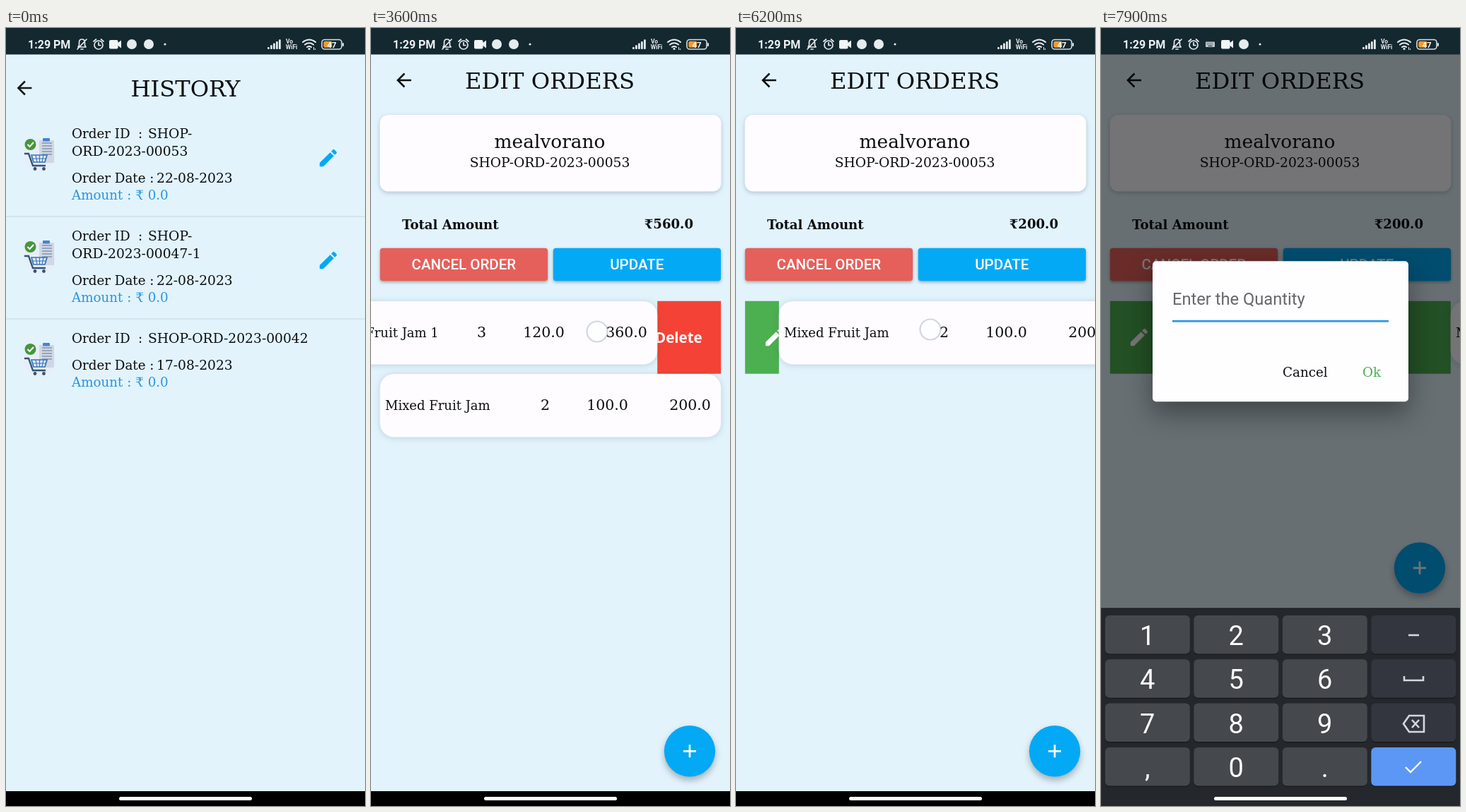
Write an HTML page that moves like this. It is 508 px wide and 1102 px high and loops after 8000 ms.

```html
<!DOCTYPE html>
<html lang="en">
<head>
<meta charset="utf-8">
<title>Order history</title>
<style>
html, body { margin: 0; width: 100%; height: 100%; overflow: hidden; background: #000; }
svg { display: block; width: 508px; height: 1102px; }
text { font: 18.3px 'DejaVu Serif', 'Noto Serif', 'DejaVu Sans', serif; fill: #0b0d10; white-space: pre; }
.title { font-size: 32.2px; }
.shop { font-size: 26.4px; }
.code { font-size: 18.7px; }
.name { font-size: 18px; }
.num { font-size: 20.5px; }
.bold { font-weight: 700; font-size: 18.1px; }
.amount { fill: #2795e0; }
.button { font: 500 20.5px Roboto, sans-serif; fill: #fff; }
.swipe { font: 700 20.5px 'Noto Sans', 'Open Sans', sans-serif; fill: #fff; }
.hint { font: 23.7px Roboto, sans-serif; fill: #67666a; }
.key { font: 38px Roboto, sans-serif; fill: #fff; }
.clock { font: 700 16px Roboto, sans-serif; fill: #eef2f4; }
.tiny { font: 700 8.5px Roboto, sans-serif; fill: #e6ebee; }
.level { font: 700 11.5px Roboto, sans-serif; fill: #fff; }
.card { fill: #fefcff; filter: drop-shadow(0 2px 3px rgba(40, 70, 90, .27)); }
.soft { fill: #fefcff; filter: drop-shadow(0 1px 5px rgba(40, 70, 90, .2)); }
.raised { filter: drop-shadow(0 2px 2px rgba(0, 0, 0, .3)); }
.fab { filter: drop-shadow(0 5px 5px rgba(0, 0, 0, .28)); }
.dialog { fill: #fefdff; filter: drop-shadow(0 16px 18px rgba(0, 0, 0, .38)); }
.line { fill: none; stroke: #e6ebee; stroke-width: 1.7; stroke-linecap: round; stroke-linejoin: round; }
</style>
</head>
<body>
<svg id="stage" viewBox="0 0 508 1102" xmlns="http://www.w3.org/2000/svg"></svg>
<script>
const LOOP = 8000, STEP = 100, ROW = 103, TRAVEL = 482;
const PENCIL = 'M3 17.25V21h3.75L17.81 9.94l-3.75-3.75L3 17.25zM20.71 7.04a1 1 0 0 0 0-1.41l-2.34-2.34a1 1 0 0 0-1.41 0l-1.83 1.83 3.75 3.75 1.83-1.83z';
const ARROW = 'M20 11H7.83l5.59-5.59L12 4l-8 8 8 8 1.41-1.41L7.83 13H20v-2z';
const TRASH = 'M6 19c0 1.1.9 2 2 2h8c1.1 0 2-.9 2-2V7H6v12zM19 4h-3.5l-1-1h-5l-1 1H5v2h14V4z';

const text = (x, y, s, cls = '', anchor = 'start', extra = '') =>
  `<text x="${x}" y="${y}" class="${cls}" text-anchor="${anchor}" ${extra}>${s}</text>`;
const mid = (x, y, s, cls) => text(x, y, s, cls, 'middle');
const rect = (x, y, w, h, fill, r = 0, extra = '') =>
  `<rect x="${x}" y="${y}" width="${w}" height="${h}" rx="${r}" fill="${fill}" ${extra}/>`;
const dot = (x, y, r, fill) => `<circle cx="${x}" cy="${y}" r="${r}" fill="${fill}"/>`;
const path = (d, extra = 'class="line"') => `<path d="${d}" ${extra}/>`;
const icon = (d, x, y, scale, fill) =>
  path(d, `fill="${fill}" transform="translate(${x} ${y}) scale(${scale}) translate(-12 -12)"`);
const group = (id, body, extra = '') => `<g id="${id}" ${extra}>${body}</g>`;

function cart(y) {
  const lines = [5, 9, 13, 17, 21].map(k => `M51 ${158 + k}h14`).join('');
  return `<g transform="translate(0 ${y})">` + dot(48, 180, 23, '#e8eef8')
    + rect(47, 159, 21, 32, '#cfd8e2', 1) + rect(52, 156, 10, 4.5, '#4583d2', 1)
    + path(lines, 'stroke="#8294b4" stroke-width="1.3"')
    + dot(34.5, 165, 8, '#46963c')
    + path('M30.5 165l3 3 5.5-6', 'fill="none" stroke="#fff" stroke-width="2"')
    + path('M36 180h22l-3 10H39z', 'fill="#dfeaf8" stroke="#3874b8" stroke-width="1.7"')
    + path('M37 185h20M42 180l2 10M47.5 180v10M53 180l-2 10', 'stroke="#3874b8" stroke-width="1.2"')
    + path('M26 178h6l6 17h18', 'fill="none" stroke="#2d5578" stroke-width="2.3"')
    + dot(41, 199.5, 2.4, '#41506a') + dot(53.5, 199.5, 2.4, '#41506a') + '</g>';
}

function order(y, id, date, pencil) {
  const drop = id.length > 1 ? 25 : 0;
  return cart(y) + text(93, 156 + y, 'Order ID') + text(187, 156 + y, ':') + text(201, 156 + y, id[0], 'code')
    + (drop ? text(93, 181 + y, id[1], 'code') : '')
    + text(93, 193.5 + drop + y, 'Order Date :') + text(213, 193.5 + drop + y, date, 'code')
    + text(93, 218 + drop + y, 'Amount : ₹ 0.0', 'amount')
    + (pencil ? icon(PENCIL, 456, 184 + y, 1.35, '#03a9f4') + rect(0, 266.3 + y, 508, 1.4, '#cfe0e9') : '');
}

const item = (id, row, name, qty, price, sum) => {
  const y = 438 + row * ROW;
  return group(id, rect(12.7, 387 + row * ROW, 482.5, 89.5, '#fefcff', 20, 'class="soft"')
    + text(20, y, name, 'name') + mid(246.5, y, qty, 'num') + mid(334.5, y, price, 'num') + mid(451.5, y, sum, 'num'));
};

const button = (x, label, fill) =>
  rect(x, 311.7, 237.3, 46.6, fill, 4, 'class="raised"') + mid(x + 118.5, 342, label, 'button');

const historyPage = rect(0, 0, 508, 1102, '#e2f3fc') + icon(ARROW, 26, 85, 1.3, '#16191c')
  + mid(254, 97, 'HISTORY', 'title')
  + order(0, ['SHOP-', 'ORD-2023-00053'], '22-08-2023', true)
  + order(145, ['SHOP-', 'ORD-2023-00047-1'], '22-08-2023', true)
  + order(290, ['SHOP-ORD-2023-00042'], '17-08-2023', false);

const editPage = rect(0, 0, 508, 1102, '#e2f3fc') + icon(ARROW, 46.5, 74, 1.3, '#0b0d10')
  + mid(253, 86, 'EDIT ORDERS', 'title')
  + rect(12.5, 123, 483, 108.5, '#fefcff', 12, 'class="card"')
  + mid(253, 170, 'mealvorano', 'shop') + mid(253, 197, 'SHOP-ORD-2023-00053', 'code')
  + text(44, 285, 'Total Amount', 'bold') + text(456, 284, '', 'bold', 'end', 'id="total"')
  + button(12.8, 'CANCEL ORDER', '#e5605a') + button(257.8, 'UPDATE', '#03a9f4')
  + '<clipPath id="reveal"><rect id="gap" y="386.7" height="103"/></clipPath><g clip-path="url(#reveal)">'
  + group('red', rect(12, 386, 484, 105, '#f44336') + icon(TRASH, 380, 438, 1.33, '#fff') + text(402, 445.5, 'Delete', 'swipe'))
  + group('green', rect(12, 386, 484, 105, '#4caf50') + icon(PENCIL, 54, 438, 1.35, '#fff') + text(76, 445.5, 'Edit', 'swipe'))
  + '</g>'
  + item('second', 1, 'Mixed Fruit Jam', '2', '100.0', '200.0')
  + item('first', 0, 'Mixed Fruit Jam 1', '3', '120.0', '360.0')
  + group('fab', `<g class="fab">${dot(451, 1024.3, 36.2, '#03a9f4')}</g>`
    + path('M442 1024.3h18M451 1015.3v18', 'stroke="#fff" stroke-width="2.7"'));

const deleteBox = rect(52, 478.5, 404, 161.5, '#fefdff', 5, 'class="dialog"')
  + rect(363, 575, 81, 47, '#f9f7fa', 4, 'id="press"')
  + text(80, 520, 'Are you sure you want to delete')
  + text(278, 605, 'Cancel') + text(374, 605, 'Delete', '', 'start', 'style="fill:#e3463c"');

const quantityBox = rect(73, 460, 362, 199, '#fefdff', 5, 'class="dialog"')
  + text(101, 522, 'Enter the Quantity', 'hint') + rect(101, 544.5, 306, 1.4, '#858488', 0, 'id="underline"')
  + rect(100.3, 501, 2.8, 28, '#139df2', 0, 'id="caret"')
  + text(257, 624, 'Cancel') + text(370, 624, 'Ok', '', 'start', 'style="fill:#4caf50"');

function keyboard() {
  let s = rect(0, 821.5, 508, 281, '#1b1d21') + rect(0, 823, 508, 279, '#24272c');
  ['123–', '456 ', '789 ', ',0. '].forEach((keys, r) => [...keys].forEach((k, c) => {
    const x = 5.8 + c * 125.5, y = 832 + r * 62.3;
    const fill = c < 3 ? '#45484c' : r < 3 ? '#33363e' : '#5c97f5';
    s += rect(x, y + 1.3, 120, 54.5, '#17191c', 6) + rect(x, y, 120, 54.5, fill, 6);
    if (c < 3) s += mid(x + 60, y + 42, k, 'key');
  }));
  const mark = 'fill="none" stroke="#d5d8dc" stroke-width="2.6"';
  return s + path('M435 860h15', mark) + path('M429 918v6h27v-6', mark)
    + path('M436 974h21v23h-21l-8-11.5zM440 980l10 11M450 980l-10 11', mark)
    + path('M431 1047l7 7 15-15', 'fill="none" stroke="#fff" stroke-width="2.4"');
}

const video = x => rect(x - 8, 17, 12.5, 12.5, '#f2f5f6', 2) + path(`M${x + 3} 22l6-4.5v11l-6-4.5z`, 'fill="#f2f5f6"');
const badge = x => dot(x, 23, 7, '#e6ebee');
const bars = [0, 1, 2, 3, 4].map(i => rect(370 + i * 4, 27 - i * 2.7, 2.8, 3 + i * 2.7, '#e6ebee', 1)).join('');
const keyIcon = rect(148, 19.5, 13, 7.5, '#c6ced2', 1)
  + path('M149.5 21.5h10M149.5 23.5h10', 'stroke="#142830" stroke-width="1" stroke-dasharray="1 1"')
  + path('M151.5 25.5h6', 'stroke="#142830" stroke-width="1"');

const statusBar = rect(0, 0, 508, 37.5, '#142830') + text(31, 29, '1:29 PM', 'clock')
  + path('M102 27h11l-1.5-2.5v-4c0-6-8-6-8 0v4zM106 30h3M101 30l13-14')
  + '<circle cx="131" cy="24" r="6" class="line"/>' + path('M131 20.5v4h3M124 19l3.5-3M138 19l-3.5-3')
  + group('icons', video(154) + badge(178) + badge(202))
  + group('typing', keyIcon + video(178) + badge(202))
  + dot(225, 23, 1.6, '#e6ebee') + bars
  + mid(401, 21.5, 'Vo', 'tiny') + mid(404, 30, 'WiFi', 'tiny')
  + path('M420 20q9-7 18 0M423 23.5q6-4.5 12 0M426 27q3-2 6 0', 'class="line" style="stroke-width:2.1"')
  + dot(429, 29.5, 1.6, '#e6ebee') + path('M435.5 27v4M437.5 29v2', 'stroke="#e6ebee" stroke-width="1"')
  + rect(447, 16.5, 28, 13.5, 'none', 4, 'stroke="#d9dfe2" stroke-width="1.6"') + rect(449.3, 18.8, 12, 9, '#f29a2e', 2)
  + mid(461, 27.5, '47', 'level') + rect(476, 21, 2, 5, '#d9dfe2', 1);

document.getElementById('stage').innerHTML = group('history', historyPage) + group('edit', editPage)
  + rect(0, 0, 508, 1102, '#000', 0, 'id="dim"')
  + group('ask', deleteBox) + group('quantity', quantityBox)
  + rect(0, 1081, 508, 21, '#000') + group('keys', keyboard())
  + rect(160, 1089, 188, 5, '#fff', 2.5) + statusBar
  + '<circle id="ring" r="14.5" fill="#fff" fill-opacity=".6" stroke="#b9c8d0" stroke-opacity=".7" stroke-width="2.2"/>';

const el = {};
document.querySelectorAll('[id]').forEach(n => el[n.id] = n);
const set = (id, attrs) => { for (const k in attrs) el[id].setAttribute(k, attrs[k]); };
const show = (id, a) => set(id, { opacity: a, visibility: a > 0 ? 'visible' : 'hidden' });
const move = (id, x, y) => set(id, { transform: `translate(${x} ${y})` });

function along(t, keys) {
  if (t <= keys[0][0]) return keys[0][1];
  for (let i = 1; i < keys.length; i++) {
    const [a, u] = keys[i - 1], [b, v] = keys[i];
    if (t < b) return u + (v - u) * (t - a) / (b - a);
  }
  return keys[keys.length - 1][1];
}
const ease = (t, a, b) => {
  const p = Math.min(1, Math.max(0, (t - a) / (b - a)));
  return 1 - (1 - p) ** 2;
};

const swipeLeft = [[3300, 0], [3500, -40], [3800, -190], [4100, -360], [4300, -TRAVEL]];
const swipeRight = [[5900, 0], [6000, 8], [6100, 26], [6200, 48], [6400, 150], [6600, 300], [6900, TRAVEL]];

function touch(t, left, right) {
  if (t >= 200 && t < 500) return [456, 184];
  if (t >= 3200 && t < 4200) return [410 + left, 430];
  if (t >= 5000 && t < 5300) return [407, 594];
  if (t >= 5800 && t < 6700) return [227 + right, 427];
  if (t >= 7300 && t < 7500) return [316, 503];
}

function draw(t) {
  const opened = ease(t, 400, 800), deleted = t >= 5100;
  const left = deleted ? 0 : along(t, swipeLeft), right = along(t, swipeRight);
  const ask = ease(t, 4400, 4700) - ease(t, 5200, 5500);
  const quantity = ease(t, 6900, 7200), up = ease(t, 7400, 7800);

  show('history', opened < 1 ? 1 : 0);
  show('edit', opened);
  const zoom = .88 + .12 * opened;
  set('edit', { transform: `translate(254 551) scale(${zoom}) translate(-254 -551)` });

  el.total.textContent = deleted ? '₹200.0' : '₹560.0';
  show('first', deleted ? 0 : 1);
  move('first', left, 0);
  move('second', right, deleted ? -ROW : 0);
  show('red', left < 0 ? 1 : 0);
  show('green', right > 0 ? 1 : 0);
  set('gap', { x: left < 0 ? 495.2 + left : 12.8, width: Math.max(-left, right) });

  show('dim', .54 * Math.max(ask, quantity));
  show('ask', ask);
  show('press', ask > 0 && t >= 5000 ? 1 : 0);
  show('quantity', quantity);
  move('quantity', 0, -129.7 * up);
  move('fab', 0, -259.5 * up);
  move('keys', 0, 282 * (1 - up));
  show('keys', up > 0 ? 1 : 0);

  const focus = t >= 7500;
  set('underline', focus ? { y: 543.5, height: 2.8, fill: '#2b98e6' } : { y: 544.5, height: 1.4, fill: '#858488' });
  show('caret', t >= 7200 && t < 7800 ? 1 : 0);
  show('icons', t < 7700 ? 1 : 0);
  show('typing', t < 7700 ? 0 : 1);

  const at = touch(t, left, right);
  show('ring', at ? 1 : 0);
  if (at) set('ring', { cx: at[0], cy: at[1] });
}

function tick() {
  draw(Math.floor(performance.now() % LOOP / STEP) * STEP);
  requestAnimationFrame(tick);
}
draw(0);
requestAnimationFrame(tick);
</script>
</body>
</html>
```
